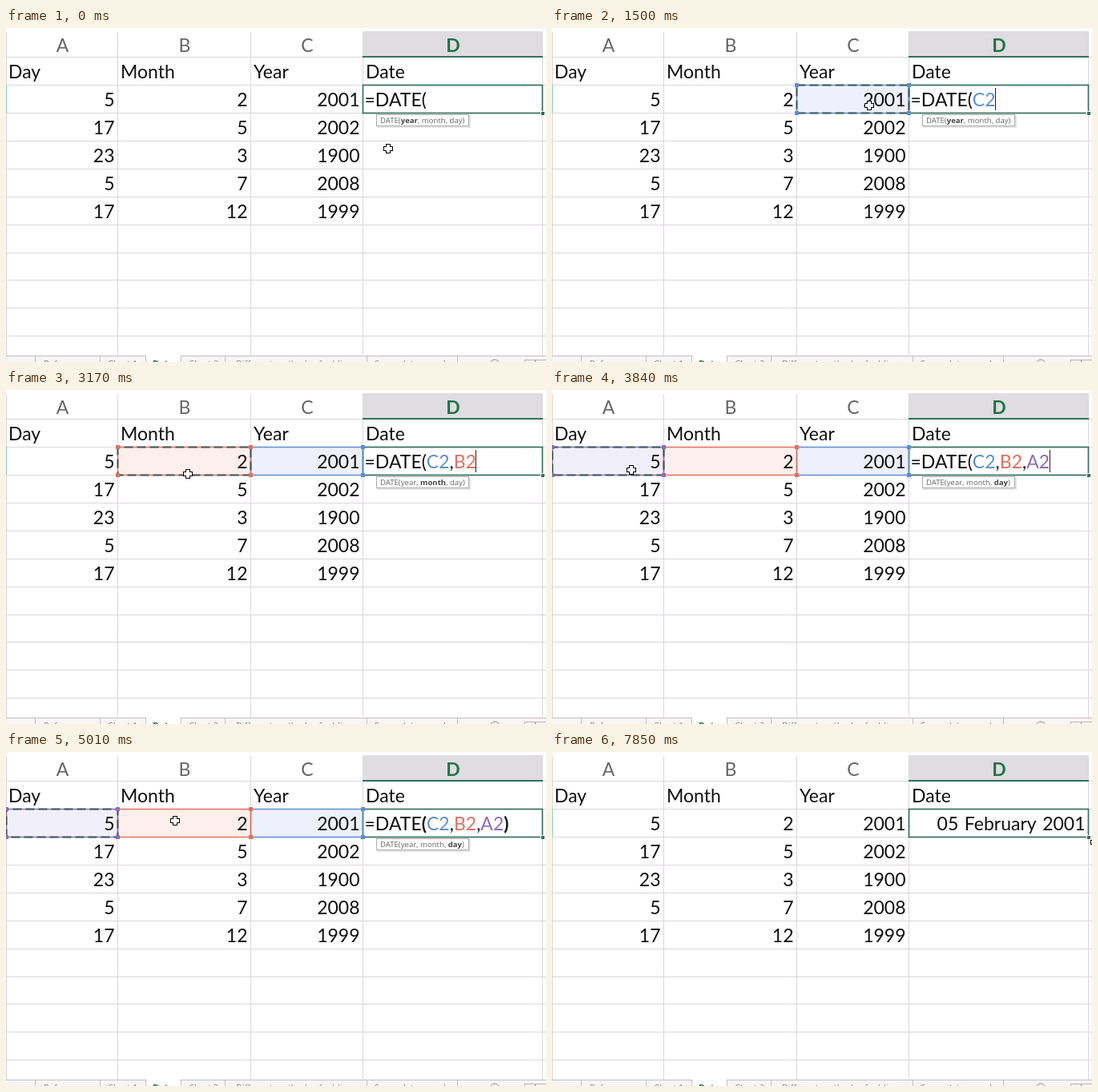
Write an HTML page with a canvas that moves like this. It is 674 px wide and 418 px high and loops after 8000 ms.

```html
<!DOCTYPE html>
<html lang="en">
<head>
<meta charset="utf-8">
<title>DATE function</title>
<style>
html, body { margin: 0; width: 100%; height: 100%; overflow: hidden; background: #fff; }
canvas { display: block; }
</style>
</head>
<body>
<canvas id="stage" width="674" height="418"></canvas>
<script>
const ctx = document.getElementById('stage').getContext('2d');
const LOOP = 8000;
const colX = [0, 139, 305, 445, 669];
const rowY = [36, 71, 106, 141, 176, 211, 246, 281, 315, 350, 385];
const data = [[5, 2, 2001], [17, 5, 2002], [23, 3, 1900], [5, 7, 2008], [17, 12, 1999]];
const GREEN = '#217346', EDGE = '#33705a', INK = '#111', GRID = '#dcd6de';
const CELL_FONT = '23px Lato, Carlito, sans-serif';
const TIP_FONT = '9.6px "Open Sans", sans-serif';

// Cells in the order they are clicked
const refs = [
  { at: 1170, col: 2, name: 'C2', color: '#5b8fd3', fill: '#eef0fc' },
  { at: 2840, col: 1, name: 'B2', color: '#e2705f', fill: '#fdefeb' },
  { at: 3670, col: 0, name: 'A2', color: '#8b6dba', fill: '#f1eff9' }
];
const commas = [1840, 3340];
const CLOSE = 4340, ENTER = 5510, RESELECT = 7010;

// Pointer stops: time, x, y
const path = [
  [0, 477, 151], [200, 477, 151], [1100, 396, 97], [1700, 396, 97],
  [2700, 227, 105], [3200, 227, 105], [3660, 99, 100], [4300, 99, 100],
  [5010, 211, 86], [5200, 230, 96], [6100, 551, 278], [6400, 551, 278],
  [6950, 575, 94], [7200, 575, 94], [7750, 678, 113], [LOOP, 678, 113]
];

function text(str, x, y, color = INK, font = CELL_FONT, align = 'left') {
  ctx.font = font;
  ctx.wordSpacing = font === CELL_FONT ? '1.6px' : '0px';
  ctx.fillStyle = color;
  ctx.textAlign = align;
  ctx.fillText(str, x, y);
  return x + ctx.measureText(str).width;
}

function rect(x, y, w, h, color) {
  ctx.fillStyle = color;
  ctx.fillRect(x, y, w, h);
}

function frame(x, y, w, h, color, width) {
  ctx.strokeStyle = color;
  ctx.lineWidth = width;
  ctx.strokeRect(x, y, w, h);
}

function drawSheet() {
  rect(0, 0, 674, 418, '#fff');
  rect(445, 4, 225, 32, '#dfdde1');
  for (const y of rowY) rect(0, y, 674, 1, GRID);
  for (const x of colX) rect(x, x === 445 ? 4 : 5, 1, 405, GRID);
  rect(445, 35, 225, 2, EDGE);
  ['A', 'B', 'C', 'D'].forEach((s, i) => {
    const last = i === 3;
    text(s, (colX[i] + colX[i + 1]) / 2 + 1, 30, last ? GREEN : '#666',
      (last ? 'bold ' : '') + CELL_FONT, 'center');
  });
  ['Day', 'Month', 'Year', 'Date'].forEach((s, i) => text(s, colX[i] + (i ? 4 : 3), 63));
}

function drawNumbers() {
  data.forEach((row, r) => row.forEach((n, c) =>
    text(n, colX[c + 1] - 3.5, 98 + 35 * r, INK, CELL_FONT, 'right')));
}

function drawTabs() {
  rect(0, 411, 674, 7, '#f8f5f7');
  rect(0, 410, 674, 1, '#c2bcc2');
  rect(175, 410, 43, 8, '#fff');
  for (const x of [36, 117, 174, 218, 273, 450, 563]) rect(x, 411, 1, 7, '#c4bec4');
  const labels = [['...', 24], ['Reference', 47], ['Chart 1', 127], ['Chart 2', 228],
    ['Different methods of adding', 287], ['Some data samples', 460], ['...', 578]];
  const font = '11px "Open Sans", sans-serif';
  for (const [s, x] of labels) text(s, x, 424, '#888', font);
  text('Date', 183, 424, GREEN, 'bold ' + font);
  ctx.beginPath();
  ctx.arc(610, 421, 6, 0, 7);
  ctx.strokeStyle = '#888';
  ctx.lineWidth = 1;
  ctx.stroke();
  frame(647.5, 415.5, 30, 8, '#b5b0b5', 1);
  rect(660, 416, 1, 2, '#888');
}

function drawSelection(y) {
  frame(445.5, y + 0.5, 224, 35, EDGE, 1.7);
  rect(667, y + 33, 5, 5, '#fff');
  rect(668, y + 34, 4, 4, EDGE);
  rect(0, y, 1, 35, '#8fcfb8');
}

function drawRef(ref, marching, t) {
  const x = colX[ref.col] + 0.5, w = colX[ref.col + 1] - colX[ref.col], y = 71.5, h = 35;
  frame(x, y, w, h, ref.color, 1.5);
  if (marching) {
    ctx.setLineDash([11, 5]);
    ctx.lineDashOffset = -Math.floor(t / 167) * 4;
    frame(x, y, w, h, '#3f5a58', 2);
    ctx.setLineDash([]);
  }
  for (const cx of [x, x + w])
    for (const cy of [y, y + h]) rect(cx - 2.5, cy - 2.5, 5, 5, ref.color);
}

function drawTip(step) {
  rect(463, 109, 117, 16, '#e4e2e5');
  rect(462, 108, 116, 15, '#fff');
  frame(462.5, 108.5, 115, 14, '#b0acb2', 1);
  let x = text('DATE(', 467, 119, '#666', TIP_FONT);
  ['year', 'month', 'day'].forEach((s, i) => {
    x = text(s, x, 119, i === step ? '#444' : '#666', (i === step ? 'bold ' : '') + TIP_FONT);
    x = text(i < 2 ? ', ' : ')', x, 119, '#666', TIP_FONT);
  });
}

function drawFormula(t, shown) {
  const closed = t >= CLOSE;
  const paren = (closed ? 'bold ' : '') + CELL_FONT;
  let x = text('=DATE', 447.5, 98);
  x = text('(', x, 98, INK, paren);
  refs.forEach((ref, i) => {
    if (t >= ref.at) x = text(ref.name, x, 98, ref.color);
    if (t >= commas[i]) x = text(',', x, 98);
  });
  if (closed) x = text(')', x, 98, INK, paren);
  const keys = [-600, CLOSE, ...commas, ...shown.map(r => r.at)].filter(k => k <= t);
  if ((t - Math.max(...keys)) % 1060 < 530) rect(Math.floor(x), 75, 1, 28, '#222');
}

function drawPointer(t) {
  const i = path.findIndex(p => p[0] > t);
  const [t0, x0, y0] = path[i - 1], [t1, x1, y1] = path[i];
  const k = (t - t0) / (t1 - t0), e = k * k * (3 - 2 * k);
  const x = Math.round(x0 + (x1 - x0) * e), y = Math.round(y0 + (y1 - y0) * e);
  rect(x - 6, y - 3, 12, 6, '#000');
  rect(x - 3, y - 6, 6, 12, '#000');
  rect(x - 5, y - 2, 10, 4, '#fff');
  rect(x - 2, y - 5, 4, 10, '#fff');
}

function draw(now) {
  const t = now % LOOP;
  const editing = t < ENTER;
  const shown = editing ? refs.filter(r => t >= r.at) : [];
  drawSheet();
  for (const r of shown)
    rect(colX[r.col] + 1, 72, colX[r.col + 1] - colX[r.col] - 1, 34, r.fill);
  drawNumbers();
  drawTabs();
  drawSelection(editing || t >= RESELECT ? 71 : 106);
  if (editing) {
    shown.forEach((r, i) => drawRef(r, i === shown.length - 1, t));
    drawFormula(t, shown);
    drawTip(commas.filter(c => t >= c).length);
  } else {
    text('05 February 2001', 665.5, 98, INK, CELL_FONT, 'right');
  }
  drawPointer(t);
  requestAnimationFrame(loop);
}

const start = performance.now();
function loop() { draw(performance.now() - start); }
loop();
</script>
</body>
</html>
```
